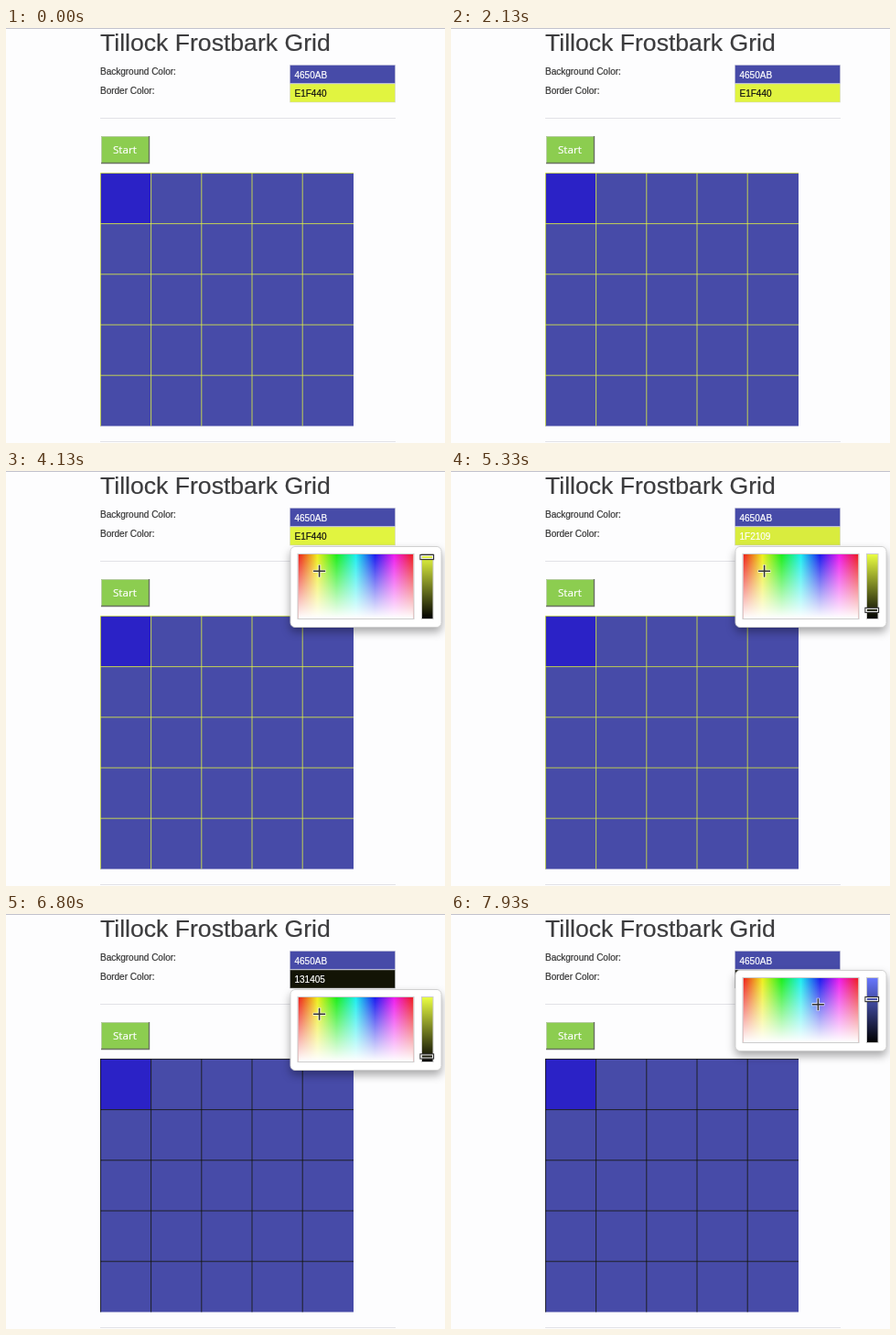
Recreate the animation shown at these times as an HTML page. Size 480 by 453 pixels, loop 8000 ms.

```html
<!DOCTYPE html>
<html lang="en">
<head>
<meta charset="utf-8">
<title>Maze colors</title>
<style>
html, body { margin: 0; width: 100%; height: 100%; overflow: hidden; background: #fdfdfe; }
svg { display: block; width: 480px; height: 453px; font: 10px "Liberation Sans", Arial, sans-serif; fill: #333; }
text { -webkit-text-stroke: .2px; }
.panel { filter: drop-shadow(0 5px 5px rgba(0, 0, 0, .33)); }
</style>
</head>
<body>
<svg viewBox="0 0 480 453">
  <defs>
    <linearGradient id="hue"></linearGradient>
    <linearGradient id="fade" x2="0" y2="1">
      <stop stop-color="#fff" stop-opacity="0"/><stop offset="1" stop-color="#fff"/>
    </linearGradient>
    <linearGradient id="value" x2="0" y2="1">
      <stop id="bright"/><stop offset="1" stop-color="#000"/>
    </linearGradient>
  </defs>
  <path d="M0 .5H480" stroke="#c2c2cc"/>
  <text x="103" y="25" font-size="26.6" fill="#3c3c3e" stroke="#3c3c3e" stroke-width=".2">Tillock Frostbark Grid</text>
  <g stroke="#333" stroke-width=".2">
    <text x="103" y="51">Background Color:</text>
    <text x="103" y="72">Border Color:</text>
  </g>
  <path d="M103 98.5H426M103 451.5H426" stroke="#e2e2e7"/>

  <g stroke="#c9cbd6" stroke-opacity=".45">
    <rect x="310.5" y="40.5" width="115" height="20" fill="#474ba8"/>
    <rect id="field" x="310.5" y="61" width="115" height="20"/>
  </g>
  <text x="315.5" y="54.5" fill="#fff" stroke="#fff" stroke-width=".2">4650AB</text>
  <text id="hex" x="315.5" y="75" stroke-width=".2"></text>

  <rect x="104" y="118" width="53" height="30" fill="#8ccd50"/>
  <path d="M104.5 148V118.5H157" fill="none" stroke="#b5cba0"/>
  <path d="M104 147.5H156.5V118" fill="none" stroke="#6b7263" stroke-width="1.4"/>
  <text x="117" y="137" font-size="11.6" font-weight="500" fill="#fff" stroke="#fff" stroke-width=".2" style="font-family:'Open Sans',sans-serif">Start</text>

  <rect x="103" y="158" width="277" height="276.5" fill="#474ba8"/>
  <rect x="103" y="158" width="55" height="55" fill="#2b22c6"/>
  <path id="lines" fill="none" stroke-opacity=".8"/>

  <g id="picker">
    <rect class="panel" x=".5" y=".5" width="165" height="88" rx="5" fill="#fff" stroke="#d0d0d0"/>
    <rect x="9" y="9" width="126" height="70" fill="url(#hue)"/>
    <rect x="9" y="9" width="126" height="70" fill="url(#fade)"/>
    <rect x="8.5" y="8.5" width="127" height="71" fill="none" stroke="#ccc"/>
    <rect x="144" y="8.5" width="12.5" height="71" fill="url(#value)" stroke="#ccc"/>
    <g id="cross" fill="none">
      <path d="M-7 0H7M0-7V7" stroke="#fff" stroke-opacity=".75" stroke-width="3.4"/>
      <path d="M-6.5 0H6.5M0-6.5V6.5" stroke="#333" stroke-width="1.5"/>
    </g>
    <g id="knob" fill="none">
      <rect x="142.5" y="-2.5" width="14.5" height="5" stroke="#333" stroke-width="1.3"/>
      <rect x="143.5" y="-1.5" width="12.5" height="3" stroke="#eee"/>
    </g>
  </g>
</svg>
<script>
const $ = id => document.getElementById(id);
const LOOP = 8000, OPEN = 3700, SWITCH = 7200;
const YELLOW = [225, 244, 64], BLUE = [70, 80, 171];

$("hue").innerHTML = [0, 1, 2, 3, 4, 5, 6].map(i =>
  `<stop offset="${i / 6}" stop-color="hsl(${i * 60},86%,52%)"/>`).join("");

let grid = "";
for (let i = 0; i < 5; i++) {
  const d = i * 55.2;
  grid += `M${103.4 + d} 158V434.5M103 ${158.4 + d}H380`;
}
$("lines").setAttribute("d", grid);

const scale = (rgb, k) => rgb.map(c => Math.round(c * k));
const css = rgb => `rgb(${rgb})`;
const hex = rgb => rgb.map(c => c.toString(16).padStart(2, "0")).join("").toUpperCase();
const ramp = (t, a, b) => Math.min(1, Math.max(0, (t - a) / (b - a)));
const smooth = x => x * x * (3 - 2 * x);

function dim(t) {
  if (t < 5330) return 1 - smooth(ramp(t, 4850, 5330)) * (1 - .1357);
  return .1357 - smooth(ramp(t, 5330, 5800)) * (.1357 - .083);
}

function showPicker(y, rgb, hue, k) {
  const max = Math.max(...rgb), sat = 1 - Math.min(...rgb) / max;
  $("picker").setAttribute("transform", `translate(310.5 ${y})`);
  $("cross").setAttribute("transform", `translate(${9 + hue / 360 * 126} ${9 + (1 - sat) * 70})`);
  $("knob").setAttribute("transform", `translate(0 ${9 + (1 - k * max / 255) * 70})`);
  $("bright").setAttribute("stop-color", css(scale(rgb, 255 / max)));
}

function draw(t) {
  const k = dim(t), ink = k < .5 ? "#fff" : "#111";
  // the painted color follows the typed value with a delay
  const painted = css(scale(YELLOW, 1 - smooth(ramp(t, 5270, 5800)) * (1 - .083)));
  $("field").setAttribute("fill", painted);
  $("lines").setAttribute("stroke", painted);
  $("hex").textContent = hex(scale(YELLOW, k));
  $("hex").setAttribute("fill", ink);
  $("hex").setAttribute("stroke", ink);
  $("picker").style.display = t < OPEN ? "none" : "";
  if (t < SWITCH) showPicker(82, YELLOW, 66, k);
  else showPicker(61, BLUE, 234, 1);
}

function tick() {
  draw(performance.now() % LOOP);
  requestAnimationFrame(tick);
}
tick();
</script>
</body>
</html>
```
